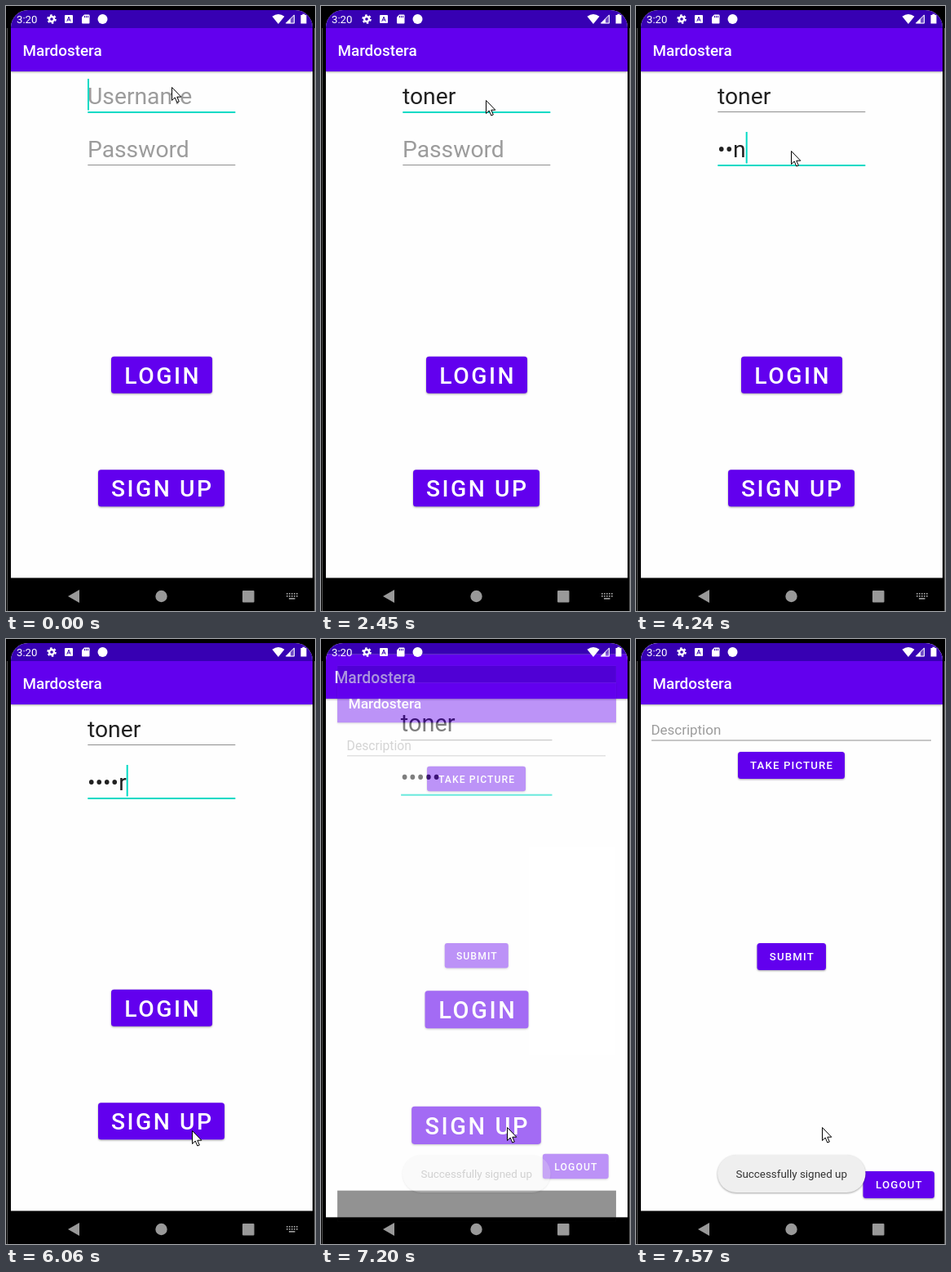
Recreate the animation shown at these times as an HTML page. Size 379 by 740 pixels, loop 8000 ms.

```html
<!DOCTYPE html>
<html lang="en">
<head>
<meta charset="utf-8">
<title>Sign up</title>
<style>
  html, body { margin: 0; width: 379px; height: 740px; overflow: hidden; background: #000; }
  svg { display: block; font-family: Roboto, sans-serif; }
  .btn { filter: drop-shadow(0 1px 1px rgba(0, 0, 0, .35)); }
  .medium { font-weight: 500; fill: #fff; }
  .hint { fill: #9c9c9c; }
  .field { font-size: 28.26px; }
</style>
</head>
<body>
<svg id="stage" width="379" height="740" viewBox="0 0 379 740"></svg>
<script>
const LOOP = 8000, PURPLE = '#6200ee', TEAL = '#03dac5', APP = 'Mardostera', USER = 'toner';
const FIELDS = [{ base: 119.5, line: 129.5, top: 89 }, { base: 184.5, line: 194.5, top: 154 }];

const rect = (x, y, w, h, fill, more = '') =>
  `<rect x="${x}" y="${y}" width="${w}" height="${h}" fill="${fill}" ${more}/>`;

const button = (x, y, w, h, size, label) => {
  const gap = size * .0893;
  return rect(x, y, w, h, PURPLE, 'rx="3.5" class="btn"') +
    `<text class="medium" text-anchor="middle" x="${x + w / 2 + gap / 2}" y="${y + h / 2 + size * .376}"
      font-size="${size}" letter-spacing="${gap}">${label}</text>`;
};

const screen = body =>
  rect(6, 5, 370, 735, '#fefefe') + rect(6, 27, 370, 53, PURPLE, 'class="btn"') +
  rect(6, 5, 370, 22, '#3700b3') + rect(6, 699.5, 370, 41, '#000') +
  `<text class="medium" x="20.5" y="61" font-size="18.84">${APP}</text>` + body;

const field = (f, i, hint) =>
  `<text class="field hint" id="hint${i}" x="100" y="${f.base}">${hint}</text>
   <text class="field" id="text${i}" x="100" y="${f.base}" fill="#212121"></text>
   <rect id="line${i}" x="100.3" width="181"/>`;

const login = screen(
  field(FIELDS[0], 0, 'Username') + field(FIELDS[1], 1, 'Password') +
  rect(0, 0, 2, 38.5, TEAL, 'id="caret"') +
  button(129, 428.8, 124, 45, 28.26, 'LOGIN') + button(113, 567.2, 155, 45, 28.26, 'SIGN UP') +
  '<circle id="ripple" cx="228" cy="598" fill="#fff" fill-opacity=".24" clip-path="url(#signup)"/>');

const compose = screen(
  '<text class="hint" x="18.5" y="117" font-size="16.96">Description</text>' +
  rect(19, 123.5, 343, 1, '#8f8f8f') +
  button(125, 138, 131, 33, 13.19, 'TAKE PICTURE') +
  button(148.5, 372, 84.5, 33, 13.19, 'SUBMIT') +
  button(278.5, 651, 87.5, 33, 13.19, 'LOGOUT'));

const statusIcons = `<g fill="#fff">
  <text x="13" y="21" font-size="13.2">3:20</text>
  <circle cx="56" cy="16" r="3" fill="none" stroke="#fff" stroke-width="2.4"/>
  <circle cx="56" cy="16" r="4.9" fill="none" stroke="#fff" stroke-width="1.8" stroke-dasharray="2.56"/>
  ${rect(72, 11, 10, 10, '#fff', 'rx="1"')}
  <path d="M74.8 18.7L77 13.3L79.2 18.7M75.7 17H78.3" fill="none" stroke="#3700b3"/>
  <path d="M96 10.5h5.5q1 0 1 1v9q0 1-1 1h-7.5q-1 0-1-1v-7z"/>
  <path d="M96.5 12v2.3M98.5 12v2.3M100.5 12v2.3" stroke="#3700b3"/>
  <circle cx="118.5" cy="16" r="6"/>
  <path d="M326.5 12.8Q334 7 341.5 12.8L334 22z"/>
  <path d="M354 10V21.5H342.5z" fill-opacity=".3"/>
  <path d="M353.5 11V21H343.5z" fill="none" stroke="#fff"/><path d="M349 15.5V21H343.5z"/>
  <path d="M361.5 11h2V9.8h3V11h2v10.5h-7z"/></g>`;

const keys = [0, 1, 2, 3, 4].flatMap(c => [0, 1].map(r => rect(344 + c * 3, 718 + r * 3, 1.7, 1.7, '#999')));
const navIcons = `<g fill="#999"><path d="M76 722L90 714V730z"/><circle cx="190.5" cy="722" r="7.2"/>
  ${rect(290, 715, 14.5, 14.5, '#999', 'rx="1"')}
  <g id="keys">${keys.join('')}${rect(347, 724, 7.5, 1.7, '#999')}</g></g>`;

const $ = id => document.getElementById(id);
$('stage').innerHTML = `<defs>
    <clipPath id="glass"><path d="M6 740V26A21 21 0 0 1 27 5H355A21 21 0 0 1 376 26V740z"/></clipPath>
    <clipPath id="signup"><rect x="113" y="567" width="155" height="45" rx="3.5"/></clipPath>
  </defs>
  ${rect(0, 0, 379, 740, '#000')}${rect(1, 27, 1, 713, '#555')}${rect(378, 27, 1, 713, '#555')}
  <g clip-path="url(#glass)"><g id="login">${login}</g><g id="compose">${compose}</g></g>
  ${statusIcons}${navIcons}
  <g id="toast">${rect(100, 631, 181.5, 46, '#efefef', 'rx="23" class="btn"')}
    <text x="190.7" y="659" text-anchor="middle" font-size="13.4" fill="#333">Successfully signed up</text></g>
  <path id="mouse" d="M.5 .5V16.5L4.2 13L6.8 19L9.3 18L6.8 12.2H11.8z" fill="#fff" stroke="#000"/>`;

// Each step lists only what changes; it holds until the next one.
const steps = [
  [0, { user: 0, pass: '', focus: 0, caret: 1, mouse: [203, 99], ripple: 0, grow: 1, shrink: 1, fade: 0, toast: 0 }],
  [120, { caret: 0 }],
  [520, { user: 1, caret: 1 }],
  [900, { caret: 0 }],
  [1210, { user: 2, caret: 1 }],
  [1460, { user: 3 }],
  [1710, { user: 4 }],
  [1830, { user: 5 }],
  [2330, { caret: 0 }],
  [2450, { mouse: [202, 115] }],
  [2570, { mouse: [195, 150] }],
  [2690, { mouse: [190, 177] }],
  [2830, { caret: 1 }],
  [2950, { focus: 1 }],
  [3450, { pass: USER[0] }],
  [3700, { pass: '•' + USER[1] }],
  [4120, { pass: '••' }],
  [4240, { pass: '••' + USER[2] }],
  [4620, { pass: '••••' + USER[4] }],
  [5160, { caret: 0 }],
  [5300, { mouse: [190, 250] }],
  [5430, { mouse: [190, 356] }],
  [5580, { mouse: [196, 500] }],
  [5700, { mouse: [208, 600], caret: 1 }],
  [5820, { mouse: [219, 624] }],
  [5940, { mouse: [225, 612] }],
  [6060, { mouse: [228, 601] }],
  [6180, { mouse: [228, 597], caret: 0 }],
  [6300, { pass: '•••••' }],
  [6440, { ripple: 30 }],
  [6560, { ripple: 90 }],
  [6680, { ripple: 130, caret: 1 }],
  [6800, { ripple: 0 }],
  [7200, { caret: 0, grow: 1.024, shrink: .924, fade: .42, toast: .22 }],
  [7320, { grow: 1.045, shrink: .985, fade: 1, toast: .7 }],
  [7440, { grow: 1.05, shrink: .997, toast: 1 }],
  [7570, { shrink: 1 }]
];

const set = (id, attrs) => Object.entries(attrs).forEach(([k, v]) => $(id).setAttribute(k, v));
const zoom = s => `translate(191 372.5) scale(${s}) translate(-191 -372.5)`;

function draw(now) {
  const t = now % LOOP;
  const s = Object.assign({}, ...steps.filter(([at]) => at <= t).map(([, change]) => change));
  [USER.slice(0, s.user), s.pass].forEach((value, i) => {
    const on = s.focus === i, f = FIELDS[i];
    $('text' + i).textContent = value;
    set('hint' + i, { opacity: value ? 0 : 1 });
    set('line' + i, { y: f.line - .5, height: on ? 2 : 1, fill: on ? TEAL : '#8f8f8f' });
    if (on) set('caret', {
      x: 100 + (value && $('text' + i).getComputedTextLength()), y: f.top, opacity: s.caret
    });
  });
  set('ripple', { r: s.ripple });
  set('mouse', { transform: `translate(${s.mouse})` });
  set('login', { transform: zoom(s.grow) });
  set('compose', { transform: zoom(s.shrink), opacity: s.fade });
  set('toast', { opacity: s.toast });
  set('keys', { opacity: s.fade ? 0 : 1 });
}

const start = performance.now();
(function tick() {
  draw(performance.now() - start);
  requestAnimationFrame(tick);
})();
</script>
</body>
</html>
```
